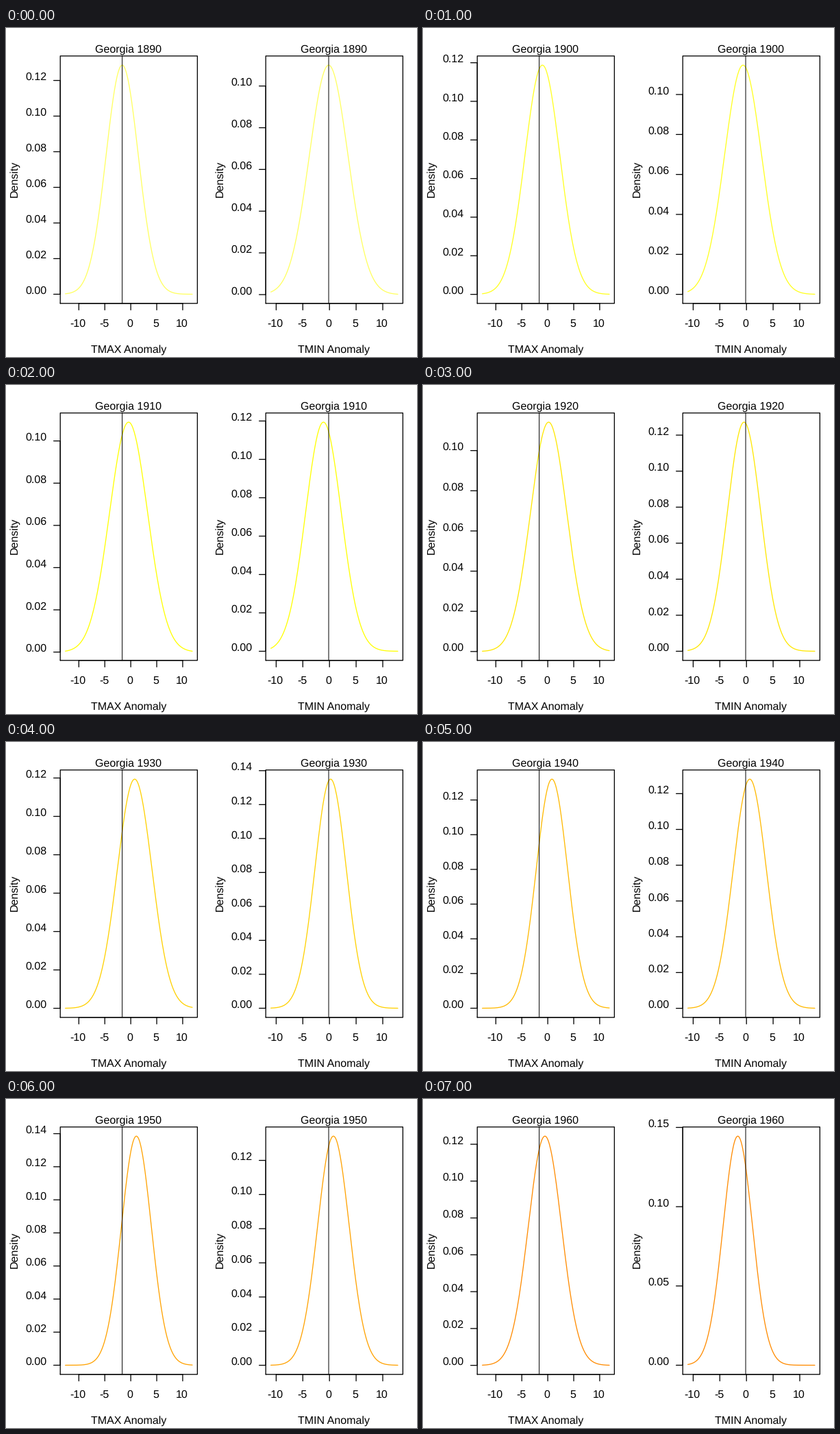
A matplotlib script that plays this animation: 600 px wide and 480 px high, repeating every 8000 ms.

```python
import matplotlib.pyplot as plt
import numpy as np
from matplotlib.animation import FuncAnimation

W, H = 600, 480
LEFT, RIGHT, TOP, BOTTOM = 79.22, 279.38, 40.82, 401.78
PAD = 0.04 / 1.08  # share of the box left free on each side
TICK = 9.6
DECADES = 8

# key decades; values between them are interpolated
KEYS = [0, 2, 4, 5, 6, 7]
PANELS = [
    dict(name="TMAX", dx=0, span=(-12.6, 11.85),
         means=[-1.65, -.42, .75, .8, 1.08, -.55],
         peaks=[.1286, .1089, .1194, .132, .1385, .1244]),
    dict(name="TMIN", dx=300, span=(-11, 12.82),
         means=[-.15, -1.13, .21, .62, .74, -1.63],
         peaks=[.11, .1194, .135, .1281, .1342, .1445]),
]

plt.rcParams.update({
    "font.family": "Liberation Sans",
    "font.size": 16,
    "text.hinting": "none",
    "axes.unicode_minus": False,
})
fig = plt.figure(figsize=(W / 72, H / 72), dpi=72, facecolor="white")
ax = fig.add_axes([0, 0, 1, 1])


def heat(i):
    """Pale yellow turning pure, then stepping towards red."""
    return 1, min(1, 1 - (i - 2) / 11), max(0, .375 - i / 4)


def line(x, y, color="black", lw=1.3):
    ax.plot(x, y, color=color, lw=lw, snap=False,
            solid_capstyle="round", solid_joinstyle="round")


def text(x, y, s, ha="center", rotation=0):
    ax.text(x, y, s, ha=ha, va="baseline", rotation=rotation,
            rotation_mode="anchor")


def scale(lo, hi, start, end):
    """Map lo..hi onto start..end, keeping the free border."""
    gap = (end - start) * PAD
    return lambda v: start + gap + (v - lo) / (hi - lo) * (end - start - 2 * gap)


def draw_panel(i, name, dx, span, means, peaks):
    mean = np.interp(i, KEYS, means)
    peak = np.interp(i, KEYS, peaks)
    left, right = LEFT + dx, RIGHT + dx
    mid = (left + right) / 2 - .5

    # normal curve with the given top
    x = np.linspace(*span, 200)
    density = peak * np.exp(-np.pi * (peak * (x - mean)) ** 2)
    px = scale(*span, left, right)
    py = scale(density.min(), peak, BOTTOM, TOP)
    line(px(x), py(density), heat(i))

    line([px(-10), px(10)], [BOTTOM, BOTTOM])
    for v in range(-10, 11, 5):
        line([px(v), px(v)], [BOTTOM, BOTTOM + TICK])
        text(px(v) - 1.2, 435.84, str(v))

    step = .05 if peak > .14 else .02
    ticks = np.arange(0, peak * 1.04, step)
    line([left, left], [py(0), py(ticks[-1])])
    for v in ticks:
        line([left, left - TICK], [py(v), py(v)])
        text(28.4 + dx, py(v) - .5, f"{v:.2f}", ha="left")

    line([left, right, right, left, left], [BOTTOM, BOTTOM, TOP, TOP, BOTTOM])
    ref = px(means[0])
    line([ref, ref], [BOTTOM, TOP], lw=1)
    text(mid, 35.2, f"Georgia {1890 + 10 * i}")
    text(mid, 473.24, f"{name} Anomaly")
    text(16.2 + dx, 220.8, "Density", rotation=90)


def draw(i):
    ax.clear()
    ax.set_xlim(0, W)
    ax.set_ylim(H, 0)
    ax.axis("off")
    for panel in PANELS:
        draw_panel(i, **panel)
    return []


anim = FuncAnimation(fig, draw, frames=DECADES, interval=1000, repeat=True,
                     repeat_delay=0, init_func=lambda: draw(0))
plt.show()
```
